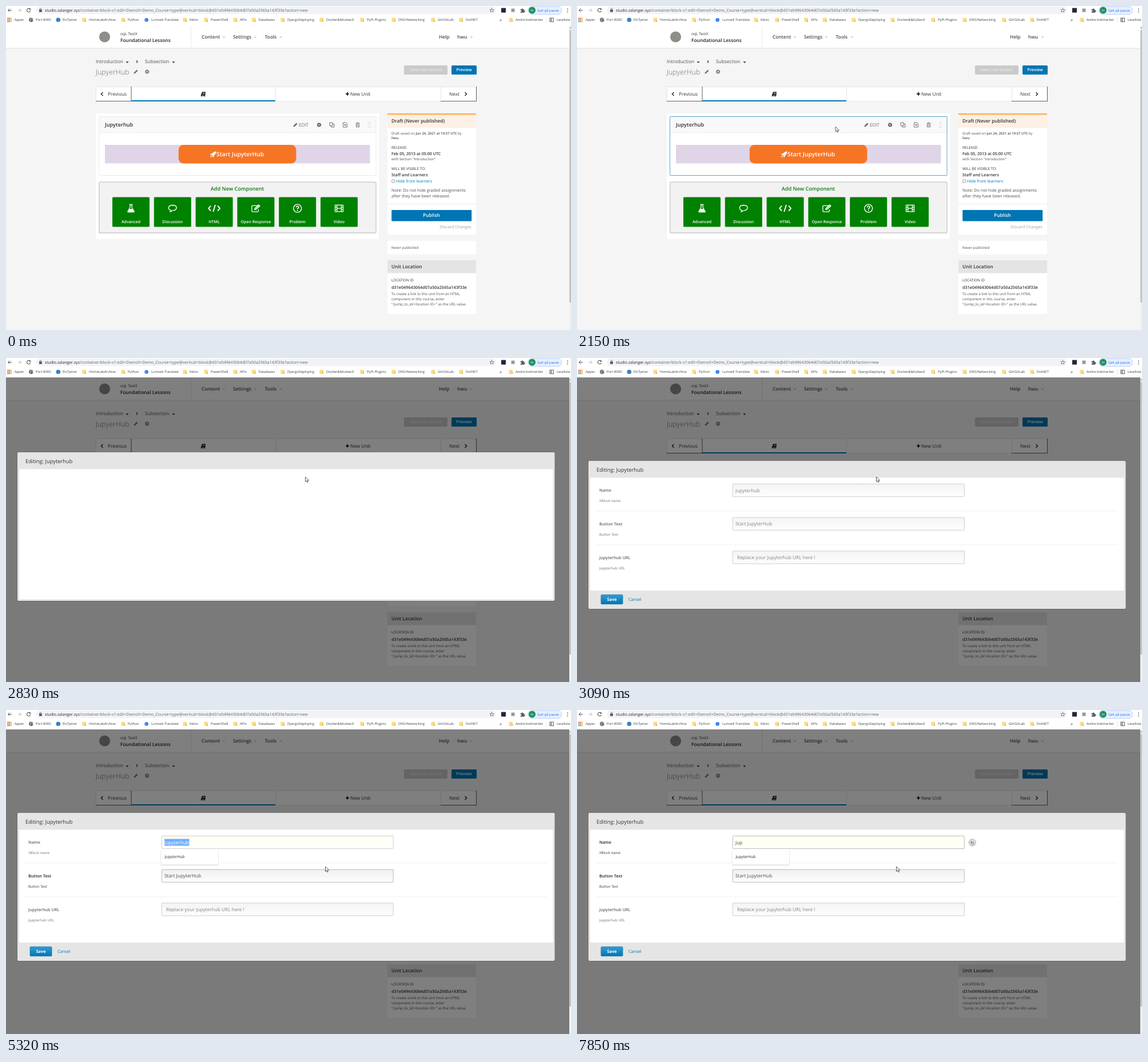
An HTML page for the animation above (8 s loop, 988 by 567 pixels).

```html
<!DOCTYPE html>
<html lang="no">
<head>
<meta charset="utf-8">
<title>Course unit editor</title>
<style>
html, body { margin: 0; width: 100%; height: 100%; overflow: hidden; background: #f5f5f5; }
svg { display: block; width: 100vw; height: 100vh; font-family: "Open Sans", "Noto Sans", sans-serif; text-rendering: geometricPrecision; }
text { white-space: pre; }
</style>
</head>
<body>
<svg id="stage" viewBox="0 0 988 567" xmlns="http://www.w3.org/2000/svg"></svg>
<script>
const BLUE = '#0075b4', INK = '#333', GREY = '#777', LINE = '#e5e5e5';

const txt = (x, y, s, size = 8.3, fill = INK, weight = 400, anchor = 'start') =>
  `<text x="${x}" y="${y}" font-size="${size}" fill="${fill}" font-weight="${weight}" text-anchor="${anchor}">${s.replace(/&/g, '&amp;').replace(/</g, '&lt;')}</text>`;
const box = (x, y, w, h, fill, extra = '') =>
  `<rect x="${x}" y="${y}" width="${w}" height="${h}" fill="${fill}" ${extra}/>`;
const dot = (x, y, r, fill, extra = '') => `<circle cx="${x}" cy="${y}" r="${r}" fill="${fill}" ${extra}/>`;
const line = (d, stroke = INK, width = 1, extra = '') =>
  `<path d="${d}" fill="none" stroke="${stroke}" stroke-width="${width}" ${extra}/>`;
const area = (d, fill = INK, extra = '') => `<path d="${d}" fill="${fill}" ${extra}/>`;
const at = (x, y, s) => `<g transform="translate(${x} ${y})">${s}</g>`;
const group = (id, s, extra = '') => `<g id="${id}" ${extra}>${s}</g>`;

const caret = (x, y, fill) => at(x, y, area('M-2.6-1.2H2.6L0 1.6Z', fill));
const chevron = (x, y, dir, size = 2.6, width = 1.6) =>
  at(x, y, line(`M${-dir * size / 2}${-size}L${dir * size / 2} 0L${-dir * size / 2} ${size}`, INK, width));
const pencil = fill => area('M-3.6 3.6L-3 1.2L1.6-3.4L3.5-1.6L-1.1 3Z', fill);
const gear = fill => dot(0, 0, 2.1, 'none', `stroke="${fill}" stroke-width="1.7"`) +
  dot(0, 0, 3.3, 'none', `stroke="${fill}" stroke-width="1.1" stroke-dasharray="1.3 1.29"`);
const folder = x => box(x, 20.8, 6.6, 7, '#fbdc83', 'rx=".7"') + box(x + 4.6, 24, 2, 3.8, '#e9bd4e');

function browser() {
  const marks = [[145, 'HomeLabArchive'], [213, 'Python'], [321, 'Kelvo'], [358, 'PowerShell'], [409, 'APIs'],
    [441.5, 'Databases'], [492, 'DjangoDeploying'], [560, 'Docker&&Kubectl'], [631, 'PyPi-Plugins'],
    [686, 'DNS/Networking'], [755, 'Git/GitLab'], [804, 'DotNET'], [891, 'Andre bokmerker']];
  const label = (x, s) => txt(x, 26.4, s, 5.9, '#3c4043');
  const apps = ['#ea4335', '#ea4335', '#fbbc04', '#34a853', '#4285f4', '#fbbc04', '#34a853', '#34a853', '#fbbc04'];
  return box(0, 0, 988, 34, '#fff') + box(52, 1, 805, 13, '#f1f3f4', 'rx="6.5"') +
    line('M10 7.5H3.6M6.6 4.3L3.4 7.5L6.6 10.7', '#555') +
    line('M20.5 7.5H26.6M23.6 4.3L26.8 7.5L23.6 10.7', '#bbb') +
    line('M41.7 5.2A3.1 3.1 0 1 0 42.6 8', '#555', 1.1) + area('M43 3.4V6.6H39.8Z', '#555') +
    box(58, 6.3, 4.8, 4.2, '#555', 'rx=".5"') + line('M59 6.5V5.4A1.4 1.4 0 0 1 61.8 5.4V6.5', '#555', .8) +
    txt(68, 10, 'studio.zalanger.xyz', 6.85, '#222') +
    txt(129, 10, '/container/block-v1:edX+DemoX+Demo_Course+type@vertical+block@d31e049643064d07a50a2565a143f33e?action=new', 7.02, '#5f6368') +
    at(849.5, 7.6, area('M0-3.8L1-1.2L3.7-1.1L1.6.6L2.3 3.2L0 1.7L-2.3 3.2L-1.6.6L-3.7-1.1L-1-1.2Z', 'none', 'stroke="#555" stroke-width=".7"')) +
    box(866, 3.5, 8, 8, '#20283a') + box(883.5, 4.5, 6, 6, '#999') +
    at(903, 7.8, area('M-3.5-2H-1.3A1.3 1.3 0 1 1 1.2-2H3V0A1.3 1.3 0 1 1 3 2.4V4H-3.5V2.2A1.2 1.2 0 1 0-3.5 0Z', '#5f6368')) +
    box(912.5, .7, 59, 14, '#e8f0fe', 'rx="7" stroke="#a8c7fa" stroke-width=".8"') + dot(920, 7.6, 6, '#1e8e5a') +
    txt(920, 10, 'H', 6.5, '#fff', 400, 'middle') + txt(929, 10, 'Satt på pause', 6, '#1a73e8') +
    [4.6, 7.6, 10.6].map(y => dot(982, y, .8, '#555')).join('') +
    apps.map((c, i) => box(2.4 + i % 3 * 2.8, 20.6 + (i / 3 | 0) * 2.8, 2, 2, c)).join('') + label(15, 'Apper') +
    dot(43.7, 24.3, 3.7, '#5f6368') + line('M41.2 22.6L43 24.6L42.6 27M44 21.2L45.4 23L46.8 23.6', '#fff', .9) + label(52, 'Port 8000') +
    dot(91.3, 24.3, 3.8, '#3d7fc0') + label(99, 'ElvTjener') +
    dot(245.7, 24.3, 3.4, '#4285f4') + label(254, 'Lumvek Translate') +
    marks.map(([x, s]) => folder(x - 11.6) + label(x, s)).join('') +
    txt(863, 26.8, '»', 8, '#444') + box(944.5, 19, .7, 10, '#ddd') +
    box(951, 21, 6.6, 6.6, 'none', 'stroke="#555" stroke-width=".9"') + line('M954.3 21V27.6M951 23.2H954M951 25.4H954', '#555', .8) +
    label(963, 'Leseliste');
}

function header() {
  const items = [[342, 'Content', 381], [397, 'Settings', 436], [452.5, 'Tools', 480.5], [757, 'Help'], [789, 'hwu', 814]];
  return box(0, 34, 985, 40, '#fff') + box(0, 73.5, 985, 1, '#dedede') + box(323, 35, .8, 39, LINE) +
    dot(172.5, 54, 9.6, '#8b9089') +
    txt(200, 51, 'oqL TestX', 6.65) + txt(200, 63, 'Foundational Lessons', 8.4, '#222', 600) +
    items.map(([x, s, c]) => txt(x, 57, s, 8.3, '#4a4a4a', 600) + (c ? caret(c, 54.6, '#ccc') : '')).join('');
}

function unitBar() {
  return txt(157, 100, 'Introduction', 8.3, '#4d4d4d') + caret(212, 98.5, INK) + chevron(229, 97.3, 1, 2.2, 1.1) +
    txt(243, 100, 'Subsection', 8.3, '#4d4d4d') + caret(293, 98.5, INK) +
    txt(157, 120, 'JupyerHub', 12.4, '#6b6b6b', 300) + at(227, 115, pencil(GREY)) + at(246.7, 115, gear(GREY)) +
    box(696, 104, 76, 16, '#cacaca', 'rx="1.5"') + txt(734, 114.4, 'View Live Version', 7.2, '#f1f1f1', 400, 'middle') +
    box(779, 104, 44, 16, BLUE, 'rx="1.5"') + txt(801, 114.4, 'Preview', 7.2, '#fff', 600, 'middle') +
    box(157, 141, 666, 26, '#fff') + line('M157.4 141.4H822.6M471.4 141V167M157.4 141V167M760.4 141V167', '#ddd', .8) +
    line('M157 166.6H219V141M760 166.6H822.5V141', '#4a4a4a', .9) + line('M471 166.6H760', LINE, .8) +
    box(219, 165, 252, 2, BLUE) +
    chevron(168, 154, -1, 3) + txt(178, 157, 'Previous') + txt(775, 157, 'Next') + chevron(804, 154, 1, 3) +
    at(345, 154, area('M-2-3.8H4L2.2 2.8H-3.2Q-4 4 1.8 3.6L4.4-3L3 4.2H-3.6Q-5 3.4-4 1.4Z', '#222') + line('M-.8-2H2.2M-1.2-.4H1.8', '#fff', .7)) +
    line('M597 150.8V156.8M594 153.8H600', '#222', 1.8) + txt(602, 157, 'New Unit');
}

function component() {
  const dots = Array.from({ length: 12 }, (_, i) => box(633 + i % 3 * 1.8, 203 + (i / 3 | 0) * 3, 1, 1, '#ccc')).join('');
  return box(157, 188, 495, 220, '#fff') + box(162.5, 193.5, 485, 28, '#f9f9f9') + box(163, 221.5, 484, .8, '#eaeaea') +
    box(162.5, 193.5, 484.6, 103, 'none', 'id="frame" stroke-width=".65" rx="1"') +
    txt(173, 211, 'Jupyterhub', 9.2, INK, 600) +
    group('edit', box(497, 200, 38, 15.5, BLUE, 'rx="1" id="editBg"') +
      at(506, 208, area('M-3.6 3.6L-3 1.2L1.6-3.4L3.5-1.6L-1.1 3Z', 'inherit')) + txt(512, 211, 'EDIT', 8, 'inherit')) +
    at(547.5, 208, gear('#555')) +
    at(570, 208, line('M-4-3.8H1.2V1.6H-4ZM1.4-1.4H4V4H-1.2V1.8', '#666', .9)) +
    at(593, 208, line('M-3.4-4H1.4L3.4-2V4H-3.4ZM0-1.8V2M-1.9.1H1.9', '#666', .9)) +
    at(615, 208, line('M-3.4-2.6H3.4M-1.2-2.8V-4H1.2V-2.8M-2.6-2.4V4H2.6V-2.4M-.9-1V2.6M.9-1V2.6', '#666', .8)) + dots +
    box(173, 243, 463.5, 32.5, '#e0d5e7') + box(301.8, 243, 205.6, 32.5, '#f67525', 'rx="8.5"') +
    at(362.5, 259.5, area('M5-5Q.4-5-2-1.4L-4.6-.8L-5.2 1.2L-2.8 1.2L-1.2 2.8L-1.2 5.2L.8 4.6L1.4 2Q5-.4 5-5ZM-3.4 2.4Q-5 2.4-5.2 5.2Q-2.4 5-2.4 3.4Z', '#fff')) +
    txt(368, 263, 'Start JupyterHub', 10.3, '#fff', 600);
}

function addPanel() {
  const w = (d, width = 1.3) => line(d, '#fff', width, 'stroke-linejoin="round"');
  const kinds = [
    ['Advanced', w('M-2.8-6.6H2.8M-1.6-6.4V-1.6L-5.6 5.4Q-6 6.6-4.8 6.6H4.8Q6 6.6 5.6 5.4L1.6-1.6V-6.4') + area('M-2.6 1H2.6L5 5.8H-5Z', '#fff')],
    ['Discussion', w('M-4.8 6Q-2.4 5-2.6 3.6Q-7 2.4-7-1.2Q-6.4-5.4 0-5.6Q6.4-5.4 7-1.2Q6.6 3.6-.4 4Q-2 5.6-4.8 6Z')],
    ['HTML', w('M-6-4.4L-10 0L-6 4.4M6-4.4L10 0L6 4.4M1.8-6L-1.8 6', 1.9)],
    ['Open Response', w('M3.4-4.8H-5.6Q-7-4.8-7-3.4V4.6Q-7 6-5.6 6H3Q4.4 6 4.4 4.6V2') + area('M-2.8 2.8L-2.2-.4L5-7L8-4L.4 2.6Z', '#fff') + line('M-1 1.2L5.8-5', '#008100', .8)],
    ['Problem', dot(0, 0, 7, 'none', 'stroke="#fff" stroke-width="1.4"') + w('M-2.2-1.8Q-2-3.8 0-3.8Q2.4-3.6 2.2-1.6Q1.8-.4.4.2Q0 .6 0 1.6', 1.6) + dot(0, 3.8, 1, '#fff')],
    ['Video', w('M-7-5.8H7V5.8H-7ZM-3.8-5.8V5.8M3.8-5.8V5.8M-3.8 0H3.8M-7-2H-3.8M-7 2H-3.8M3.8-2H7M3.8 2H7')]
  ];
  return box(162.8, 308.2, 484.2, 89, '#f2f2f2', 'rx="2" stroke="#c4c4c4" stroke-width="1.2"') +
    txt(404.5, 323.4, 'Add New Component', 9.1, '#0f7a0f', 600, 'middle') +
    kinds.map(([name, icon], i) => at(186 + 72.8 * i, 334.6,
      box(0, 0, 65, 52, '#008100', 'rx="1.5"') + at(32.5, 19.5, icon) + txt(32.5, 45.4, name, 7, '#fff', 600, 'middle'))).join('');
}

function sidebar() {
  const x = 674, small = '#4d4d4d';
  return box(667, 190, 155, 210, '#fff') + box(667, 190, 155, 23, '#fdf0e4') + box(667, 187.8, 155, 2.6, '#fdb15f') +
    txt(x, 204.4, 'Draft (Never published)', 8.25, INK, 600) +
    `<text x="${x}" y="224.8" font-size="6" fill="${small}">Draft saved on <tspan font-weight="600">Jun 24, 2021 at 19:37 UTC</tspan> by</text>` +
    txt(x, 233.4, 'hwu', 6, small, 600) +
    txt(x, 250, 'RELEASE:', 6.5) + txt(x, 261, 'Feb 05, 2013 at 05:00 UTC', 7.1, INK, 600) +
    txt(x, 270.2, 'with Section "Introduction"', 6.2, small) +
    txt(x, 287, 'WILL BE VISIBLE TO:', 6.5) + txt(x, 298, 'Staff and Learners', 7.2, INK, 600) +
    box(674.8, 304, 5, 5, '#fff', 'stroke="#777" stroke-width=".7" rx=".6"') + txt(682, 309.4, 'Hide from learners', 7.2, BLUE) +
    txt(x, 325, 'Note: Do not hide graded assignments', 7.25, small) + txt(x, 335.2, 'after they have been released.', 7.25, small) +
    box(667, 346, 155, .8, LINE) + box(674.2, 357, 140, 19.5, BLUE, 'rx="1"') +
    txt(744, 369.2, 'Publish', 8.3, '#fff', 600, 'middle') + txt(814, 389.4, 'Discard Changes', 7.2, '#9a9fa2', 400, 'end') +
    box(667, 411, 155, 23.5, '#fff') + txt(x, 425, 'Never published', 6.2, small) +
    box(667, 445, 155, 94, '#fff') + box(667, 445, 155, 22.5, '#e4e4e4') + txt(x, 459.2, 'Unit Location', 8.3, INK, 600) +
    txt(x, 482, 'LOCATION ID', 6.4) + txt(x, 494.8, 'd31e049643064d07a50a2565a143f33e', 7.25, INK, 600) +
    ['To create a link to this unit from an HTML', 'component in this course, enter', '"/jump_to_id/<location ID>" as the URL value.']
      .map((s, i) => txt(x, 506.4 + 8.9 * i, s, 6.25, small)).join('');
}

const scrollbar = () => box(985, 34, 3, 533, '#f1f1f1') + box(985.3, 42, 2.7, 477, '#c1c1c1') + area('M985.4 39L986.8 37L988 39Z', '#777');

const modalFrame = (y, h, bottom) =>
  box(19.5, y - .5, 940.5, h + 1.5, '#000', 'rx="2.5" opacity=".15"') + box(20, y, 939.5, h, '#e5e5e5', 'rx="2"') +
  box(23, y + 29.5, 933.5, h - 29.5 - bottom, '#fff') + txt(34, y + 18.6, 'Editing: Jupyterhub', 9.3);

function settings() {
  const row = (i, name, help, x, value, fill) => group('row' + i,
    txt(39, 234.4, name, 7.2, '#222', 600) + txt(39, 252.2, help, 6.15, INK) +
    box(272.3, 220.4, 405, 22.2, 'url(#fieldFill)', `id="field${i}" rx="1" stroke="#b2b2b2" stroke-width=".9"`) +
    (i ? '' : box(277, 225.6, 43.3, 12, '#338fff', 'id="selection"')) +
    `<text id="value${i}" x="${x}" y="234.8" font-size="8.3" fill="${fill}">${value}</text>`,
    `transform="translate(0 ${58.7 * i})"`);
  return modalFrame(180, 259, 32) +
    box(33, 267.4, 913, .8, '#ececec') + box(33, 326.6, 913, .8, '#ececec') +
    row(0, 'Name', 'XBlock name', 277, 'Jupyterhub', '#4d4d4d') +
    row(1, 'Button Text', 'Button Text', 277, 'Start JupyterHub', '#4d4d4d') +
    row(2, 'Jupyterhub URL', 'Jupyterhub URL', 280, 'Replace your Jupyterhub URL here !', '#4d4d4d') +
    box(42, 414.3, 38, 16.4, 'url(#saveFill)', 'rx="1.5" stroke="#0a6ca6" stroke-width=".7"') +
    txt(61, 425, 'Save', 7.4, '#fff', 700, 'middle') + txt(90, 425, 'Cancel', 7.3, BLUE) +
    group('reset', at(691.3, 232, dot(0, 0, 6.2, '#dcdcdc', 'stroke="#a8a8a8" stroke-width=".8"') +
      line('M-2.4-.6H1A1.9 1.9 0 0 1 1 3H-1.6M-.8-2.4L-2.6-.6L-.8 1.2', '#666', 1))) +
    box(0, 226, .7, 11, '#222', 'id="textCaret"') +
    group('suggest', box(270.6, 244, 101.2, 28, '#000', 'opacity=".14" rx="1.5"') + box(271.2, 243.4, 100, 27.4, '#fff', 'rx="1"') +
      txt(277.6, 259.4, 'JupyterHub', 6.6, '#222'));
}

const cursors = () =>
  group('arrow', area('M0 0V8.6L2 6.8L3.3 9.7L4.7 9.1L3.4 6.2H6Z', '#fff', 'stroke="#333" stroke-width=".8"')) +
  group('hand', area('M.6 1Q1.5-.2 2.4 1V4L6 4.8Q6.8 5.2 6.6 6.4L5.8 10H1.8L-1.4 6.4Q-1.2 5.2.6 6.4Z', '#fff', 'stroke="#222" stroke-width=".8"')) +
  group('beam', line('M-1.9-4.2Q0-4.4 0-3.4Q0-4.4 1.9-4.2M0-3.4V3.4M-1.9 4.2Q0 4.4 0 3.4Q0 4.4 1.9 4.2', '#222', .9));

const stage = document.getElementById('stage');
const gradient = (id, from, to) => `<linearGradient id="${id}" x2="0" y2="1"><stop stop-color="${from}"/><stop offset="1" stop-color="${to}"/></linearGradient>`;
stage.innerHTML = '<defs>' + gradient('fieldFill', '#f0f0f0', '#fdfdfd') + gradient('focusFill', '#fffff0', '#fffffa') +
  gradient('saveFill', '#2b9fd9', '#0873b0') + '</defs>' +
  box(0, 34, 985, 533, '#f5f5f5') + header() + unitBar() + component() + addPanel() + sidebar() + scrollbar() +
  box(0, 34, 985, 533, '#000', 'id="shade" opacity=".5"') +
  group('loading', modalFrame(165, 260, 3)) + group('form', settings()) + browser() +
  dot(0, 0, 5.8, '#c8cf28', 'id="halo" opacity=".85"') + group('cursor', cursors());

const ui = {};
stage.querySelectorAll('[id]').forEach(el => { ui[el.id] = el; });
const show = (el, on) => el.setAttribute('display', on ? 'inline' : 'none');

const LOOP = 8000, STEP = 70;
const OPEN = 2830, READY = 3090;
const path = [[520, 973.5, 557], [590, 978, 556.5], [650, 983, 560], [1390, 983, 560], [1460, 900, 505], [1600, 620, 330],
  [1740, 395, 207], [2010, 430, 212], [2220, 488, 210], [2430, 523.5, 208], [3480, 523.5, 208], [3620, 470, 222],
  [3840, 365, 238], [3970, 365, 238], [4280, 362.5, 234], [4380, 362, 233.5], [4700, 362, 233.5], [4850, 410, 242], [5300, 558.5, 274]];
const typed = [[0, 'Jupyterhub'], [6660, 'J'], [6860, 'Ju'], [7320, 'Jup']];

// The pointer is sampled at a fixed rate, so it moves in small jumps.
function pointer(time) {
  const t = 1460 + Math.floor((time - 1460) / STEP) * STEP;
  const i = path.findIndex(p => p[0] > t);
  if (i === 0) return path[0].slice(1);
  if (i < 0) return path[path.length - 1].slice(1);
  const [a, b] = [path[i - 1], path[i]], k = (t - a[0]) / (b[0] - a[0]);
  return [a[1] + (b[1] - a[1]) * k, a[2] + (b[2] - a[2]) * k];
}

function mix(a, b, k) {
  return `rgb(${a.map((v, i) => Math.round(v + (b[i] - v) * k))})`;
}

function draw(t) {
  const [x, y] = pointer(t);
  const open = t >= OPEN, ready = t >= READY;

  const glow = open ? 0 : Math.min(1, Math.max(0, (t - 1670) / 250));
  ui.frame.setAttribute('stroke', mix([222, 222, 222], [0, 117, 180], glow));
  const overEdit = !open && x > 497 && x < 535 && y > 199 && y < 216;
  show(ui.editBg, overEdit);
  ui.edit.setAttribute('fill', overEdit ? '#fff' : '#6b6b6b');

  show(ui.shade, open);
  show(ui.loading, open && !ready);
  show(ui.form, ready);

  const focused = t >= 4580, edited = t >= 6660;
  const hover = y > 209 ? Math.floor((y - 209) / 58.7) : -1;
  for (let i = 0; i < 3; i++)
    ui['row' + i].setAttribute('opacity', hover === i || (i === 0 && edited) ? 1 : .7);
  const selected = t >= 4720 && !edited;
  ui.field0.setAttribute('fill', focused ? 'url(#focusFill)' : 'url(#fieldFill)');
  show(ui.selection, selected);
  ui.value0.textContent = typed.filter(k => k[0] <= t).pop()[1];
  ui.value0.setAttribute('fill', selected ? '#fff' : '#4d4d4d');
  show(ui.suggest, t >= 4650);
  show(ui.reset, edited);
  show(ui.textCaret, edited && t < 7850);
  if (edited) ui.textCaret.setAttribute('x', 277 + ui.value0.getComputedTextLength());

  const overField = ready && x > 272 && x < 677 && y > 220 && y < 243;
  show(ui.cursor, t >= 520);
  ui.cursor.setAttribute('transform', `translate(${x} ${y})`);
  show(ui.hand, overEdit);
  show(ui.beam, overField);
  show(ui.arrow, !overEdit && !overField);
  show(ui.halo, (t >= 2640 && t < OPEN) || (t >= 4580 && t < 4720));
  ui.halo.setAttribute('cx', x);
  ui.halo.setAttribute('cy', y);
}

const start = performance.now();
function tick() {
  draw((performance.now() - start) % LOOP);
  requestAnimationFrame(tick);
}
tick();
</script>
</body>
</html>
```
